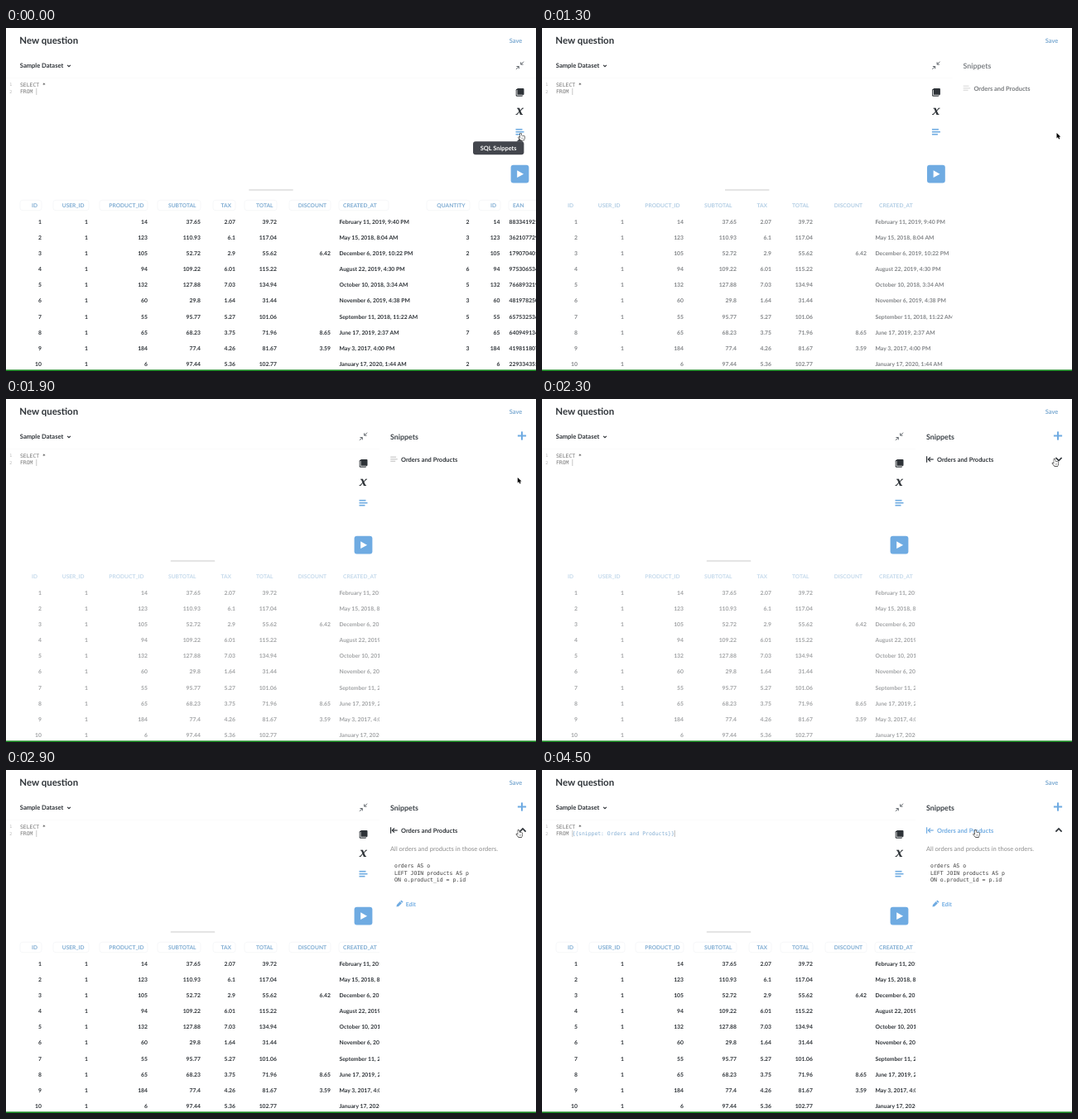
Recreate the animation shown at these times as an HTML page with a canvas. Size 640 by 415 pixels, loop 5500 ms.

```html
<!DOCTYPE html>
<html lang="en">
<head>
<meta charset="utf-8">
<title>SQL snippets</title>
<style>
  html, body { margin: 0; width: 100%; height: 100%; overflow: hidden; background: #fff; }
  canvas { display: block; width: 640px; height: 415px; }
</style>
</head>
<body>
<canvas id="stage"></canvas>
<script>
const W = 640, H = 415, LOOP = 5500, STEP = 100, PANEL = 189;
const BLUE = '#6fabe2', HEAD = '#7dabd2', DARK = '#2e3338';
const SANS = 'Lato, sans-serif', MONO = '"DejaVu Sans Mono", monospace';

const canvas = document.getElementById('stage');
const ctx = canvas.getContext('2d');
const dpr = window.devicePixelRatio || 1;
canvas.width = W * dpr;
canvas.height = H * dpr;
ctx.textRendering = 'geometricPrecision';

// name, alignment, cell edge, header edge, pill left, pill right
const COLS = [
  ['ID', 'right', 43, 38, 17, 43],
  ['USER_ID', 'right', 99, 94.5, 57, 100],
  ['PRODUCT_ID', 'right', 171, 166.5, 113, 171],
  ['SUBTOTAL', 'right', 235, 229.5, 183, 235],
  ['TAX', 'right', 277, 272, 250, 277],
  ['TOTAL', 'right', 327, 322.5, 288, 327],
  ['DISCOUNT', 'right', 392, 387, 342, 392],
  ['CREATED_AT', 'left', 402.5, 407, 402, 462],
  ['QUANTITY', 'right', 559.5, 554.5, 508, 560],
  ['ID', 'right', 596.5, 592, 571, 597],
  ['EAN', 'left', 607.5, 612, 607, 660]
];

// product | subtotal | tax | total | discount | created | quantity | ean
const ROWS = `14|37.65|2.07|39.72||February 11, 2019, 9:40 PM|2|883341921
123|110.93|6.1|117.04||May 15, 2018, 8:04 AM|3|362107729
105|52.72|2.9|55.62|6.42|December 6, 2019, 10:22 PM|2|179070401
94|109.22|6.01|115.22||August 22, 2019, 4:30 PM|6|975306534
132|127.88|7.03|134.94||October 10, 2018, 3:34 AM|5|766893219
60|29.8|1.64|31.44||November 6, 2019, 4:38 PM|3|481978250
55|95.77|5.27|101.06||September 11, 2018, 11:22 AM|5|657532536
65|68.23|3.75|71.96|8.65|June 17, 2019, 2:37 AM|7|640949134
184|77.4|4.26|81.67|3.59|May 3, 2017, 4:00 PM|3|419811807
6|97.44|5.36|102.77||January 17, 2020, 1:44 AM|2|229334355`
  .split('\n').map((line, i) => {
    const [prod, sub, tax, total, disc, date, qty, ean] = line.split('|');
    return [String(i + 1), '1', prod, sub, tax, total, disc, date, qty, prod, ean];
  });

const TABLE_FADE = [[1100, 1], [1300, .6], [1500, .45], [2600, .45], [2700, .74], [2900, 1]];
const PANEL_OPEN = [[1100, 0], [1200, .38], [1300, .765], [1400, .94], [1500, 1]];
const PANEL_FADE = [[1100, .1], [1300, .65], [1600, 1]];
const MOUSE_X = [[1600, 621.5], [1900, 617.8], [2200, 618.8], [3400, 618.8], [3500, 612],
  [3700, 572], [3900, 536.5], [4000, 525], [4100, 523.5]];
const MOUSE_Y = [[1600, 127], [1900, 95], [2200, 72.3]];

function track(keys, t) {
  if (t <= keys[0][0]) return keys[0][1];
  for (let i = 1; i < keys.length; i++) {
    const [t0, v0] = keys[i - 1], [t1, v1] = keys[i];
    if (t <= t1) return v0 + (v1 - v0) * (t - t0) / (t1 - t0);
  }
  return keys[keys.length - 1][1];
}

// y is the middle of the capital letters
function text(str, x, y, size, color, { weight = 700, align = 'left', font = SANS } = {}) {
  ctx.font = `${weight} ${size}px ${font}`;
  ctx.textAlign = align;
  ctx.fillStyle = color;
  ctx.fillText(str, x, y + size * .36);
}

function code(str, x, y, size, color) {
  text(str, x, y, size, color, { weight: 400, font: MONO });
}

function path(points, close) {
  ctx.beginPath();
  points.forEach(([x, y], i) => i ? ctx.lineTo(x, y) : ctx.moveTo(x, y));
  if (close) ctx.closePath();
}

function line(points, color, width) {
  path(points);
  ctx.strokeStyle = color;
  ctx.lineWidth = width;
  ctx.stroke();
}

function shape(points, color) {
  path(points, true);
  ctx.fillStyle = color;
  ctx.fill();
}

function box(x, y, w, h, color) {
  ctx.fillStyle = color;
  ctx.fillRect(x, y, w, h);
}

function pill(x, y, w, h, r) {
  ctx.beginPath();
  ctx.roundRect(x, y, w, h, r);
}

function at(x, y, draw) {
  ctx.save();
  ctx.translate(x, y);
  draw();
  ctx.restore();
}

function chevron(x, y, r, dir, width) {
  line([[x - r, y - dir * r / 2], [x, y + dir * r / 2], [x + r, y - dir * r / 2]], DARK, width);
}

function snippetIcon(x, y, s, color) {
  box(x - 5 * s, y - 3.8 * s, 8 * s, 1.6 * s, color);
  box(x - 5 * s, y - .8 * s, 10 * s, 1.6 * s, color);
  box(x - 5 * s, y + 2.2 * s, 7 * s, 1.6 * s, color);
}

function insertIcon(x, y, color) {
  line([[x + .6, y - 3.7], [x + .6, y + 3.7]], color, 1.2);
  line([[x + 2.4, y], [x + 8.7, y]], color, 1.2);
  line([[x + 5, y - 2.6], [x + 2.4, y], [x + 5, y + 2.6]], color, 1.2);
}

function shrinkIcon() {
  for (const s of [1, -1]) {
    line([[4.6 * s, -4.6 * s], [1.2 * s, -1.2 * s]], '#60666c', 1);
    line([[1.2 * s, -4 * s], [1.2 * s, -1.2 * s], [4 * s, -1.2 * s]], '#60666c', 1);
  }
}

function bookIcon() {
  ctx.fillStyle = DARK;
  pill(-4.8, -4.2, 8.4, 9, 1.4);
  ctx.fill();
  pill(-3.3, -4.9, 8.3, 8, 1);
  ctx.fill();
  line([[-3.5, -3], [-3.5, 3.2], [3.4, 3.2]], '#fff', .8);
}

function pencilIcon(x, y) {
  at(x, y, () => {
    ctx.rotate(-Math.PI / 4);
    shape([[-5, 0], [-2.8, -1.5], [2.6, -1.5], [2.6, 1.5], [-2.8, 1.5]], BLUE);
    box(3.2, -1.5, 1.7, 3, BLUE);
  });
}

function toolbar(shift) {
  at(620.5 - shift, 0, () => {
    at(0, 45.3, shrinkIcon);
    at(0, 78, bookIcon);
    text('x', 0, 99.2, 15.5, DARK,
      { weight: 'italic 700', align: 'center', font: '"Noto Serif", serif' });
    snippetIcon(0, 125.7, 1, BLUE);
    pill(-10.9, 165.8, 21.8, 21.8, 3);
    ctx.fillStyle = BLUE;
    ctx.fill();
    shape([[-3.3, 172.3], [4.6, 176.7], [-3.3, 181.1]], '#fff');
  });
}

function editor(edge, inserted) {
  box(0, 60, edge, .7, '#f9f9f9');
  code('1', 4.3, 68.6, 5, '#b5b5b5');
  code('2', 4.3, 77, 5, '#b5b5b5');
  code('SELECT', 17, 68.6, 6.42, '#777');
  code('*', 44, 68.6, 6.42, '#222');
  code('FROM', 17, 77, 6.42, '#777');
  box(36.5, 73, .7, 8, '#b0b0b0');
  if (inserted) {
    code('{{snippet: Orders and Products}}', 36.4, 77, 6.42, '#84aed3');
    box(159.8, 73, .7, 8, '#999');
  }
  box(edge / 2 - 26.7, 195.2, 53.4, 1.5, '#dcdcdc');
}

function table(edge, alpha) {
  ctx.save();
  ctx.beginPath();
  ctx.rect(0, 200, edge, 213);
  ctx.clip();
  ctx.globalAlpha = alpha;
  COLS.forEach(([name, align, cellX, headX, left, right], c) => {
    if (alpha === 1) {
      pill(left, 208.3, right - left, 12.4, 3);
      ctx.strokeStyle = '#f2f4f6';
      ctx.lineWidth = .7;
      ctx.stroke();
    }
    text(name, headX, 214.7, 6.65, HEAD, { align });
    ROWS.forEach((row, r) => text(row[c], cellX, 234.1 + r * 19.17, 6.8, DARK, { align }));
  });
  ctx.restore();
}

function panel(t, open, mouse) {
  const hover = mouse.y < 82;
  const expanded = t >= 2800;
  const onTitle = expanded && mouse.x < 549;
  const color = onTitle ? BLUE : DARK;
  ctx.save();
  ctx.translate(PANEL * (1 - open), 0);
  ctx.globalAlpha = track(PANEL_FADE, t);
  text('Snippets', 464, 45.7, 8.9, '#3c4248');
  box(617.9, 43.5, 10.2, 2, BLUE);
  box(622, 39.4, 2, 10.2, BLUE);
  if (hover) insertIcon(464, 73, color);
  else snippetIcon(468.5, 72.8, .85, '#cfcfcf');
  text('Orders and Products', 477, 73, 7.45, color);
  if (hover) chevron(624, 72.8, 3.6, expanded ? -1 : 1, 1.7);
  if (expanded) {
    text('All orders and products in those orders.', 464, 95.3, 7.55, '#8c8c8c', { weight: 400 });
    ['orders AS o', 'LEFT JOIN products AS p', 'ON o.product_id = p.id']
      .forEach((s, i) => code(s, 469, 115.9 + i * 8.6, 6.5, '#3c3c3c'));
    pencilIcon(475, 162);
    text('Edit', 482.7, 162, 7, BLUE);
  }
  ctx.restore();
}

function tooltip(alpha) {
  if (!alpha) return;
  ctx.globalAlpha = alpha;
  pill(564, 137.3, 61.4, 15.9, 3);
  ctx.fillStyle = '#43464d';
  ctx.fill();
  shape([[616.5, 137.5], [620.5, 133.5], [624.5, 137.5]], '#43464d');
  text('SQL Snippets', 594.7, 145.2, 7.4, '#fff', { align: 'center' });
  ctx.globalAlpha = 1;
}

function outlined(points, fill, stroke, width) {
  path(points, true);
  ctx.lineJoin = 'round';
  ctx.lineWidth = width;
  ctx.strokeStyle = stroke;
  ctx.stroke();
  ctx.fillStyle = fill;
  ctx.fill();
  ctx.lineJoin = 'miter';
}

function pointer({ x, y }, hand) {
  at(x, y, () => {
    if (!hand) {
      outlined([[0, 0], [0, 6.4], [1.5, 5.1], [2.6, 7.5], [3.8, 7], [2.8, 4.7], [4.7, 4.6]],
        '#000', '#fff', 1);
      return;
    }
    outlined([[-.6, .6], [.6, .6], [1, 3.2], [4.6, 4], [4.7, 6], [3.8, 8.8], [.2, 8.8],
      [-2.6, 5.6], [-2, 4.9], [-.5, 5.9]], '#fff', '#222', 1.1);
    for (const dx of [1.3, 2.8]) line([[dx, 5.6], [dx, 7.4]], '#555', .5);
  });
}

function click(t, start, x, y) {
  const age = t - start;
  if (age < 0 || age >= 200) return;
  ctx.globalAlpha = age < 100 ? 1 : .4;
  ctx.beginPath();
  ctx.arc(x, y, 15.4, 0, 2 * Math.PI);
  ctx.strokeStyle = '#000';
  ctx.lineWidth = 1.6;
  ctx.stroke();
  ctx.globalAlpha = 1;
}

function draw(t) {
  const open = track(PANEL_OPEN, t);
  const edge = W - PANEL * open;
  const mouse = { x: track(MOUSE_X, t), y: track(MOUSE_Y, t) };

  ctx.setTransform(dpr, 0, 0, dpr, 0, 0);
  box(0, 0, W, H, '#fff');

  text('New question', 16.3, 15, 11.45, DARK);
  text('Save', 623.3, 15, 7.5, HEAD, { align: 'right' });
  text('Sample Dataset', 16.8, 45.2, 7.55, DARK);
  chevron(76, 45.8, 1.9, 1, 1.1);

  editor(edge, t >= 4400);
  toolbar(W - edge);
  table(edge, track(TABLE_FADE, t));
  if (open > 0) panel(t, open, mouse);
  box(0, 413.4, W, 1.6, '#16861f');

  tooltip(Math.max(0, 1 - t / 200));
  pointer(mouse, t < 1200 || mouse.y < 82);
  click(t, 2700, 618.2, 72.2);
  click(t, 4300, 525, 72.4);
}

function tick(now) {
  draw(Math.floor(now % LOOP / STEP) * STEP);
  requestAnimationFrame(tick);
}

draw(0);
requestAnimationFrame(tick);
</script>
</body>
</html>
```
